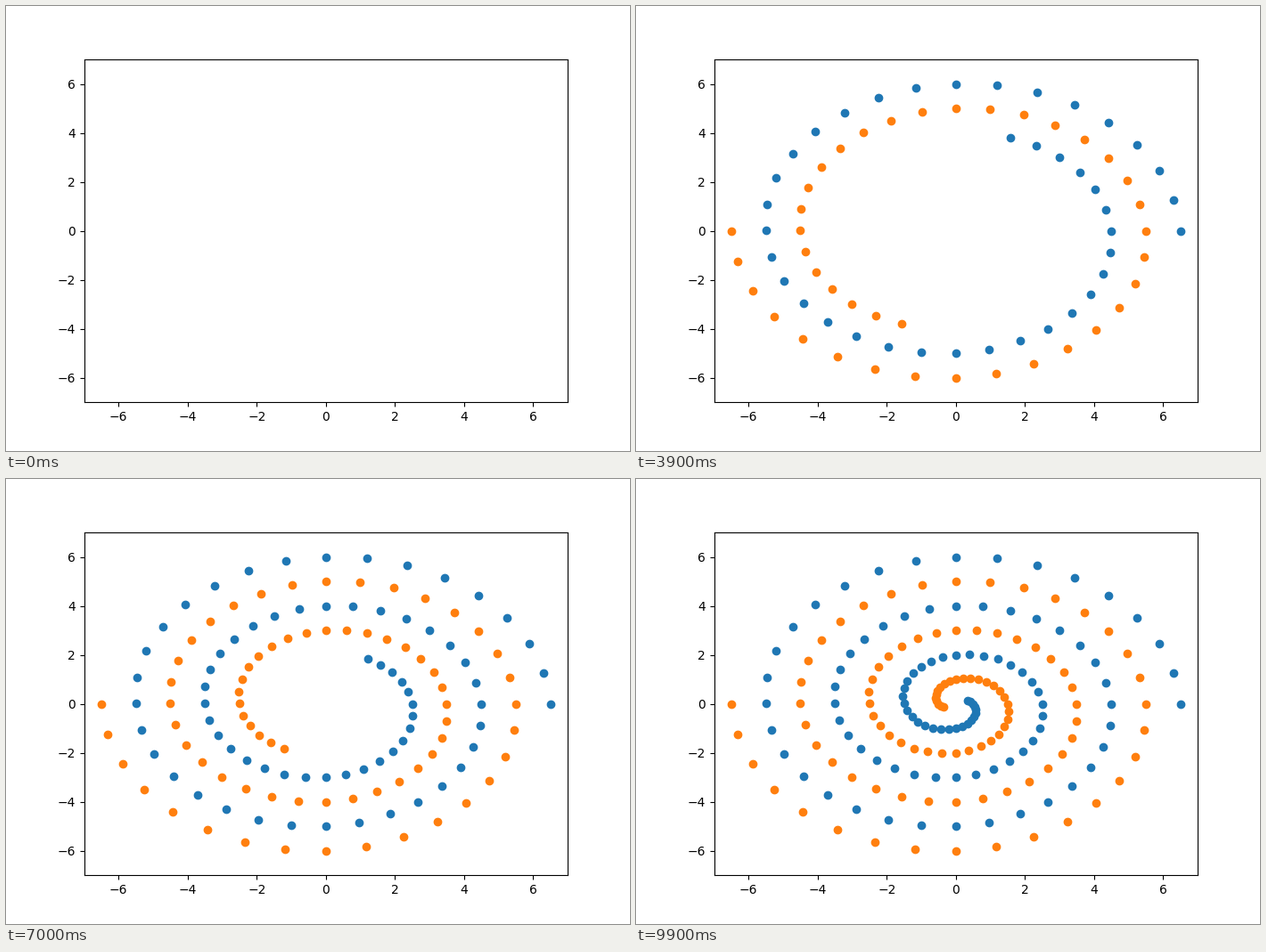
Write a matplotlib script that moves like this. It is 700 by 500 pixels and loops after 10 s.

```python
import numpy as np
import matplotlib.pyplot as plt
from matplotlib.animation import FuncAnimation

FRAMES = 100

# Two interleaved spirals, the second one the first turned by half a turn
i = np.arange(FRAMES)
phi = i / 16 * np.pi
r = 6.5 * (104 - i) / 104
x, y = r * np.cos(phi), r * np.sin(phi)

fig, ax = plt.subplots(figsize=(7, 5), dpi=100)
ax.set_xlim(-7, 7)
ax.set_ylim(-7, 7)
first, = ax.plot([], [], "o", color="tab:blue")
second, = ax.plot([], [], "o", color="tab:orange")


def update(n):
    first.set_data(x[:n], y[:n])
    second.set_data(-x[:n], -y[:n])
    return first, second


anim = FuncAnimation(fig, update, frames=FRAMES, interval=100,
                     repeat=True, repeat_delay=0)
plt.show()
```
